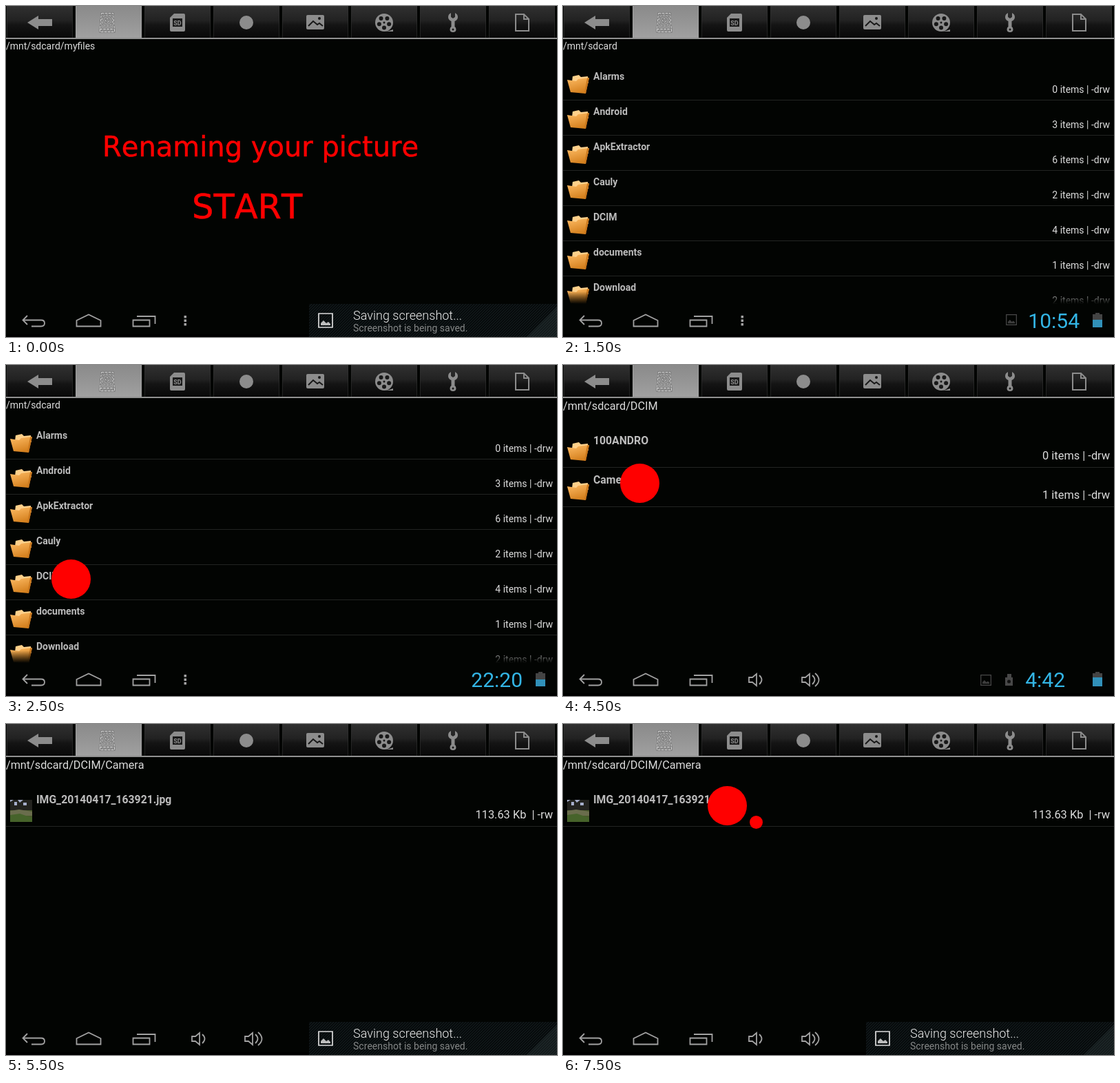
Animation of 800x480 px, one loop 8000 ms. Source, as an HTML page:

```html
<!DOCTYPE html>
<html lang="en">
<head>
<meta charset="utf-8">
<title>File manager walkthrough</title>
<style>
  html, body { margin: 0; height: 100%; overflow: hidden; background: #020402; }
  svg { display: block; width: 800px; height: 480px; font-family: Roboto, sans-serif; font-kerning: none; }
  .title { font-family: "DejaVu Sans", sans-serif; fill: #f00; stroke: #f00; stroke-width: .5; }
  .path { fill: #dcdcdc; }
  .name { font-weight: bold; fill: #bcbcbc; }
  .info { text-anchor: end; fill: #dcdcdc; }
  .clock { text-anchor: end; fill: #33b5e5; }
  .line { fill: none; stroke: #a2a2a2; stroke-width: 1.8; }
</style>
</head>
<body>
<svg viewBox="0 0 800 480">
  <defs>
    <linearGradient id="tab" x2="0" y2="1">
      <stop stop-color="#303030"/><stop offset=".45" stop-color="#222"/>
      <stop offset=".6" stop-color="#141414"/><stop offset="1" stop-color="#080808"/>
    </linearGradient>
    <linearGradient id="active" x2="0" y2="1">
      <stop stop-color="#8a8a8a"/><stop offset="1" stop-color="#a0a0a0"/>
    </linearGradient>
    <linearGradient id="orange" x2=".4" y2="1">
      <stop stop-color="#ffbd66"/><stop offset="1" stop-color="#d5811f"/>
    </linearGradient>
    <linearGradient id="fade" x2="0" y2="1">
      <stop stop-color="#020402" stop-opacity="0"/><stop offset="1" stop-color="#020402"/>
    </linearGradient>
    <pattern id="stripes" width="4" height="4" patternUnits="userSpaceOnUse">
      <rect width="4" height="4" fill="#070b0c"/>
      <path d="M-1 1L1-1M-1 5L5-1M3 5L5 3" stroke="#1a2427" stroke-width=".8"/>
    </pattern>
    <g id="folder">
      <path d="M13 110L14 102 23 100 26 103 36 102 37 112z" fill="#ffd08a"/>
      <path d="M6 107L19 109 22 106 38 104 33 127 11 125z" fill="url(#orange)"/>
      <path d="M38 104L33 127 31 127 35 105z" fill="#c9771d"/>
    </g>
    <g id="photo">
      <rect x="6" y="110" width="32" height="32" fill="#4a5a2c"/>
      <path d="M6 110h32v9H6z" fill="#a6aecb"/>
      <path d="M6 113l5-3h6l3 4 5-4h13v15H6z" fill="#23231f"/>
      <path d="M12 113h4v5h-4zM25 114h5v4h-5z" fill="#a6aecb"/>
      <path d="M6 126l13-2 19 3v6H6z" fill="#6a6d4c"/>
      <path d="M6 132l14-2 18 6v6H6z" fill="#46632a"/>
    </g>
    <g id="picture">
      <path d="M1 1h20v20H1z" fill="none" stroke="currentColor" stroke-width="1.700"/>
      <path d="M4 18v-3l4-4 4 4 3-2 3 3v2z" fill="currentColor" opacity=".85"/>
    </g>
    <path id="speaker" d="M270 453h5l6-5v17l-6-5h-5zM285 450q7 6.500 0 13"/>
    <g id="disk">
      <path d="M138.500 10.500h17l2 23v4h-21v-4zM136 33.500h21"/>
      <circle cx="147" cy="21" r="8"/><circle cx="147" cy="21" r="2.500"/>
    </g>
  </defs>

  <rect width="800" height="480" fill="#020402"/>
  <path d="M0 476h800v4H0z"/>
  <g id="tabs"></g>
  <path d="M0 46h800v2H0z" fill="#919191"/>
  <g fill="#8c8c8c">
    <path d="M31 24l16-10v5h20v10H47v5z"/>
    <path d="M244 11h14q2 0 2 2v22q0 2-2 2h-18q-2 0-2-2V17z"/>
    <path d="M242 18h14v12h-14z" fill="#1a1a1a"/>
    <text x="249" y="27.500" font-size="9" font-weight="bold" text-anchor="middle">SD</text>
    <circle cx="349" cy="24" r="10"/>
    <rect x="436" y="13" width="26" height="21" rx="2"/>
    <path d="M439 29l7-7 6 5 3-2 5 4" fill="none" stroke="#181818" stroke-width="2"/>
    <circle cx="455" cy="18" r="2" fill="#181818"/>
    <path d="M549 37q7 0 13-3v3h-13z"/>
    <circle cx="549" cy="24" r="13"/>
    <g id="holes" fill="#181818"><circle cx="549" cy="24" r="1.500"/></g>
    <path d="M646 10v6l3 2 3-2v-6q4 2 4 6 0 4-4.500 6v8q2 1 2 4 0 4-4.500 4t-4.500-4q0-3 2-4v-8q-4.500-2-4.500-6 0-4 4-6z"/>
    <circle cx="649" cy="34" r="1.500" fill="#181818"/>
    <path d="M740 12h12l7 7v17h-19zM752 12v7h7" fill="none" stroke="#8c8c8c" stroke-width="2"/>
  </g>
  <g fill="none">
    <use href="#disk" stroke="#666" stroke-width="2"/>
    <use href="#disk" stroke="#d8d8d8" stroke-dasharray="4 1"/>
  </g>
  <g class="line">
    <path d="M31 449l-6.500 6.500 6.500 6.500M25 455.500h26q5 0 5 4.500t-5 4.500H37"/>
    <path d="M102.500 456l17.500-8.500 17.500 8.500v8.500h-35z"/>
    <path d="M184.500 455.500h24v9h-24zM190 450h26.500v11"/>
  </g>
  <g id="screen"></g>
</svg>
<script>
const $ = id => document.getElementById(id);
const repeat = (n, draw) => Array.from({ length: n }, (_, i) => draw(i)).join('');

$('tabs').innerHTML = repeat(8, i => {
  const x = i * 100 + 1;
  return `<rect x="${x}" width="96" height="46" fill="url(#${i === 1 ? 'active' : 'tab'})"/>
    <path d="M${x + .5} 0v46M${x + 95.5} 0v46" stroke="${i === 1 ? '#aaa' : '#333'}" opacity=".6"/>`;
});
$('holes').innerHTML += repeat(5, i => {
  const a = (i * 72 + 90) * Math.PI / 180;
  return `<circle cx="${549 + 7.5 * Math.cos(a)}" cy="${24 + 7.5 * Math.sin(a)}" r="3"/>`;
});

const text = (x, y, size, cls, str) => `<text x="${x}" y="${y}" font-size="${size}" class="${cls}">${str}</text>`;
const dot = (x, y, r = 28.5) => `<circle cx="${x}" cy="${y}" r="${r}" fill="red"/>`;
const picture = (x, y, scale, color) =>
  `<use href="#picture" transform="translate(${x} ${y}) scale(${scale})" color="${color}"/>`;
const smallPath = str => text(0, 63, 14, 'path', str);
const bigPath = str => text(0, 65, 16.2, 'path', str);

const smallRow = (i, name, count) => `<use href="#folder" y="${i * 51}"/>
  ${text(44, 107 + i * 51, 14, 'name', name)}
  ${text(794, 126 + i * 51, 14, 'info', count + ' items | -drw')}
  <path d="M0 ${136 + i * 51}h800v1H0z" fill="#222422"/>`;
const bigRow = (i, icon, name, info) => `<use href="#${icon}" y="${i * 57 + (icon === 'folder' ? 12 : 0)}"/>
  ${text(44, 115 + i * 57, 15.75, 'name', name)}
  ${text(794, 137 + i * 57, 16.4, 'info', info)}
  <path d="M0 ${148 + i * 57}h800v1H0z" fill="#222422"/>`;

const menu = repeat(3, i => `<rect x="258.500" y="${449 + i * 5.5}" width="3.500" height="3.500" fill="#a2a2a2"/>`);
const volume = `<g class="line"><use href="#speaker"/><use href="#speaker" x="77"/>
  <path d="M366 447q11 9.500 0 19"/></g>`;
const status = (time, right, level) => `${text(right, 467, 30, 'clock', time)}
  <path d="M773 445h6v2h4v19h-14v-19h4z" fill="#444"/>
  <path d="M769 ${level}h14V466h-14z" fill="#3191ba"/>`;
const notice = `<path d="M440 432h360v48H440z" fill="url(#stripes)"/>
  <path d="M800 436v44h-44z" fill="#788" opacity=".12"/>
  ${picture(453, 445, 1, '#ddd')}
  <text x="504" y="455" font-size="18" font-weight="300" fill="#eee">Saving screenshot...</text>
  <text x="504" y="472" font-size="14" fill="#858787">Screenshot is being saved.</text>`;

const counts = { Alarms: 0, Android: 3, ApkExtractor: 6, Cauly: 2, DCIM: 4, documents: 1, Download: 2 };
const empty = smallPath('/mnt/sdcard/myfiles') + menu + notice;
const card = smallPath('/mnt/sdcard')
  + Object.entries(counts).map(([name, count], i) => smallRow(i, name, count)).join('')
  + `<path d="M0 414h800v18H0z" fill="url(#fade)"/><path d="M0 432h800v12H0z" fill="#020402"/>` + menu;
const dcim = bigPath('/mnt/sdcard/DCIM')
  + bigRow(0, 'folder', '100ANDRO', '0 items | -drw')
  + bigRow(1, 'folder', 'Camera', '1 items | -drw')
  + volume + picture(606, 449, .73, '#484848')
  + `<path d="M645 448h6v5h2v12h-11v-12h3z" fill="#484848"/><circle cx="647.500" cy="459" r="2.500" fill="#111"/>`
  + status('4:42', 729, 453);
const camera = bigPath('/mnt/sdcard/DCIM/Camera')
  + bigRow(0, 'photo', 'IMG_20140417_163921.jpg', '113.63 Kb\u00a0 | -rw') + volume + notice;
const titles = text(140, 218, 40, 'title', 'Renaming your picture') + text(270, 308, 49.5, 'title', 'START');
const press = dot(238.5, 118.5);

const scenes = [
  [0, empty + titles],
  [500, empty + dot(40.5, 456.5)],
  [1500, card + picture(643, 447, .73, '#484848') + status('10:54', 750, 455)],
  [2500, card + status('22:20', 750, 456) + dot(94.5, 310.5)],
  [3500, dcim],
  [4500, dcim + dot(111.5, 171.5)],
  [5500, camera],
  [6500, camera + press],
  [7500, camera + press + dot(280.5, 142.5, 9.5)]
];

let shown;
function tick() {
  const time = performance.now() % 8000;
  const scene = scenes.findLast(([start]) => start <= time);
  if (scene !== shown) $('screen').innerHTML = (shown = scene)[1];
  requestAnimationFrame(tick);
}
tick();
</script>
</body>
</html>
```
